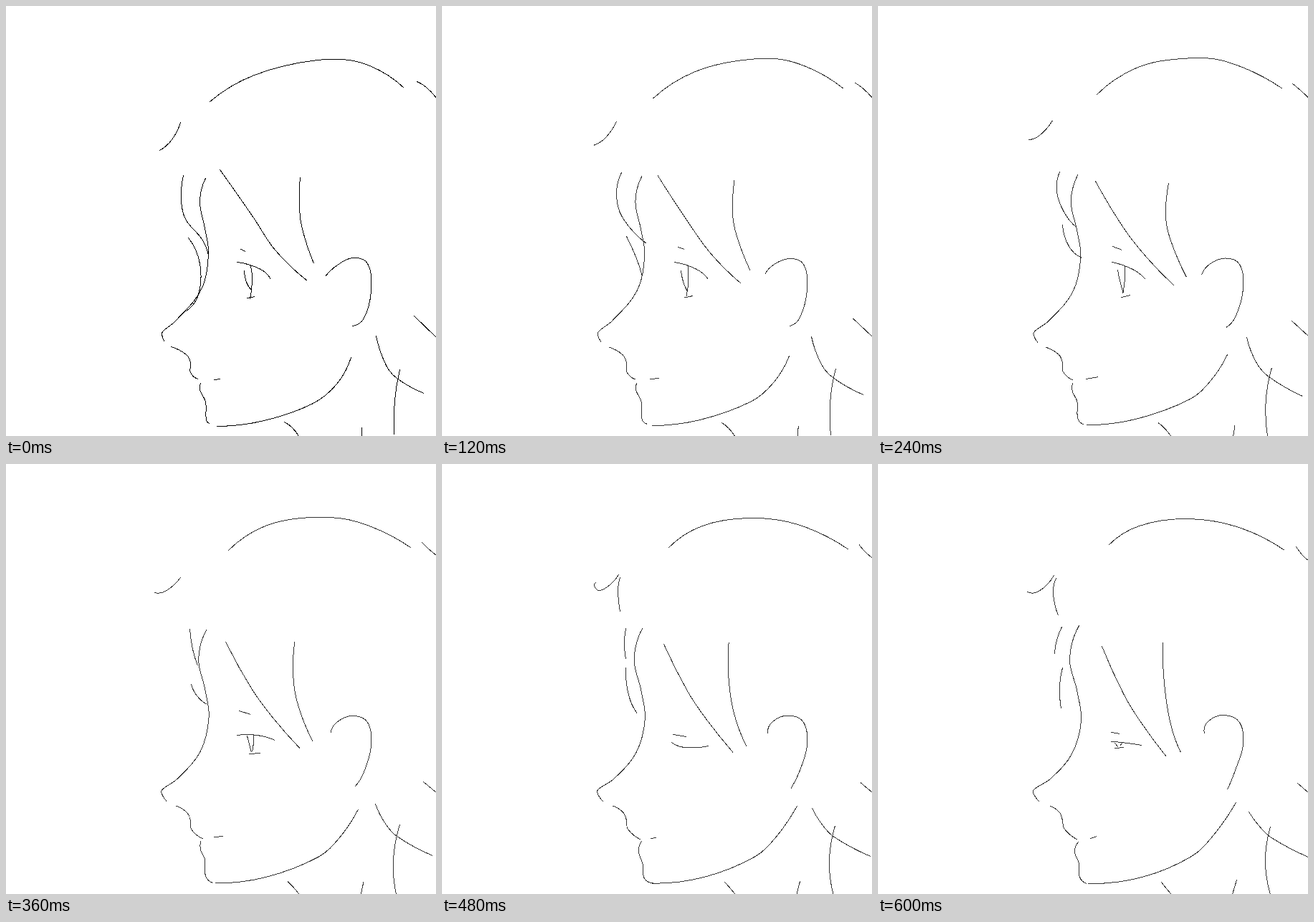
An HTML page that plays this animation: 600 by 600 pixels, repeating every 720 ms.

```html
<!DOCTYPE html>
<html lang="en">
<head>
<meta charset="utf-8">
<title>Blinking profile</title>
<style>
html, body { margin: 0; width: 100%; height: 100%; overflow: hidden; background: #fff; }
svg { display: block; width: 100%; height: 100%; }
path { fill: none; stroke: #333; stroke-width: 1; shape-rendering: crispEdges; }
g:first-child path { stroke: #000; }
g { visibility: hidden; animation: pose 720ms step-end infinite; }
@keyframes pose {
  0% { visibility: visible; }
  16.666%, 100% { visibility: hidden; }
}
</style>
</head>
<body>
<svg id="stage" viewBox="0 0 600 600"></svg>
<script>
const POSES = 6, HOLD = 120;

const make = (tag, attrs, parent) => {
  const el = document.createElementNS('http://www.w3.org/2000/svg', tag);
  for (const k in attrs) el.setAttribute(k, attrs[k]);
  return parent.appendChild(el);
};

const stage = document.getElementById('stage');
const poses = Array.from({ length: POSES }, (_, i) => make('g', {
  transform: 'translate(.5 .5)',
  style: `animation-delay:${(i ? i - POSES : 0) * HOLD}ms`
}, stage));

const sub = (a, b) => [a[0] - b[0], a[1] - b[1]];
const unit = ([x, y]) => {
  const len = Math.hypot(x, y) || 1;
  return [x / len, y / len];
};
// Mirror a tangent in its chord, so that the end of a line keeps bending.
const mirror = (dir, chord) => {
  const dot = 2 * (dir[0] * chord[0] + dir[1] * chord[1]);
  return [dot * chord[0] - dir[0], dot * chord[1] - dir[1]];
};

function curve(pts) {
  const last = pts.length - 1;
  if (last === 1) return `M${pts[0]}L${pts[1]}`;
  const dirs = pts.map((p, i) => unit(sub(pts[Math.min(i + 1, last)], pts[Math.max(i - 1, 0)])));
  dirs[0] = mirror(dirs[1], dirs[0]);
  dirs[last] = mirror(dirs[last - 1], dirs[last]);
  let d = 'M' + pts[0];
  for (let i = 1; i <= last; i++) {
    const a = pts[i - 1], b = pts[i], u = dirs[i - 1], v = dirs[i];
    const h = Math.hypot(...sub(b, a)) * .35;
    d += `C${a[0] + u[0] * h},${a[1] + u[1] * h} ${b[0] - v[0] * h},${b[1] - v[1] * h} ${b}`;
  }
  return d;
}

const parse = text => text.split(' ').map(p => p.split(',').map(Number));

// Draw one line in every pose, blending between the given key poses.
function trace(keys) {
  const times = Object.keys(keys).map(Number);
  poses.forEach((group, i) => {
    const from = times.filter(t => t <= i).pop();
    if (from === undefined || !keys[from]) return;
    const to = times.find(t => t >= i) ?? from;
    const k = to > from ? (i - from) / (to - from) : 0;
    const a = parse(keys[from]), b = parse(keys[to]);
    const pts = k ? a.map((p, n) => p.map((v, axis) => v + (b[n][axis] - v) * k)) : a;
    make('path', { d: curve(pts) }, group);
  });
}

// Crown and back of the head
trace({
  0: '284,133 346,96 434,75 496,79 555,114',
  2: '304,124 360,86 424,73 485,77 564,115',
  5: '321,113 364,86 430,76 500,87 567,120'
});
trace({ 0: '573,105 586,113 600,128', 3: '580,109 588,117 600,127', 5: '583,115 592,127 600,134' });

// Tuft
trace({
  0: '243,162 231,186 214,201',
  3: '243,158 222,177 207,179',
  4: '246,154 234,168 219,176 212,169 215,165',
  5: '245,155 224,177 208,178'
});
trace({ 4: '248,158 245,175 248,206', 5: '248,159 244,180 251,211' });

// Fringe
trace({
  0: '247,236 244,270 250,297 273,325 282,347',
  1: '250,232 243,262 251,294 285,331',
  2: '253,231 249,258 259,287 277,309',
  3: '256,230 260,258 267,281',
  4: '256,229 254,250 256,272',
  5: '256,227 249,245 246,265'
});
trace({
  0: '254,323 270,359 268,402 251,425',
  1: '257,321 271,352 279,377',
  2: '257,305 266,335 284,351',
  3: '258,307 266,323 280,335',
  4: '256,284 260,322 272,348',
  5: '257,284 253,310 255,341'
});

// Forehead and nose
trace({
  0: '278,240 270,272 277,310 282,345 272,395 236,439 219,453 217,458 221,468',
  5: '280,225 267,272 277,315 283,358 270,404 241,438 218,453 216,458 225,471'
});

// Lips, chin and jaw
trace({ 0: '230,475 251,486 257,497 257,511 268,520', 5: '240,477 253,486 257,497 259,508 278,524' });
trace({
  0: '271,526 270,535 278,552 279,577 284,582',
  3: '271,526 271,538 277,551 278,574 288,584',
  4: '278,526 274,540 280,559 282,578 295,584',
  5: '279,527 274,541 280,557 281,576 291,585'
});
trace({
  0: '294,586 360,578 428,554 461,527 481,490',
  2: '291,584 359,576 435,548 464,522 487,486',
  5: '293,585 368,576 437,547 468,517 499,472'
});
trace({ 0: '290,521 299,520', 2: '290,520 307,517', 3: '290,520 303,519', 4: '291,522 299,521', 5: '296,522 305,519' });

// Brow, lid and eye
trace({
  0: '327,339 334,342', 1: '329,336 338,339', 2: '327,335 340,340',
  3: '325,344 341,349', 4: '322,377 341,380', 5: '325,374 337,376'
});
trace({
  0: '322,357 355,367 369,381',
  2: '326,357 355,367 373,381',
  3: '322,378 350,378 375,385',
  4: '320,388 338,395 372,393',
  5: '325,387 340,388 368,392'
});
trace({ 0: '332,369 335,385 342,396', 2: '334,368 337,383 342,400', 3: '336,379 342,402', 4: '', 5: '330,389 335,395' });
trace({ 0: '341,362 343,382 340,409', 2: '344,363 344,380 341,401', 3: '345,378 345,388 343,401', 4: '', 5: '340,389 337,393' });
trace({ 0: '336,407 347,405', 2: '339,406 352,403', 3: '339,404 355,403', 4: '', 5: '330,396 343,395' });

// Side locks
trace({
  0: '298,228 345,295 375,340 420,383',
  2: '303,244 342,309 375,351 413,390',
  5: '312,254 342,320 365,358 402,408'
});
trace({
  0: '410,239 409,284 414,315 429,359',
  2: '405,247 401,292 407,324 430,378',
  5: '397,249 399,306 408,363 422,402'
});

// Ear
trace({
  0: '445,377 462,361 484,351 504,359 509,397 499,435 483,446',
  1: '450,374 463,360 485,352 504,360 509,395 499,434 485,446',
  5: '455,376 460,359 482,350 504,360 509,391 498,427 487,454'
});

// Nape and neck
trace({ 0: '569,432 600,462', 2: '577,439 600,460', 3: '582,443 600,458', 5: '585,445 600,458' });
trace({
  0: '516,460 530,501 545,519 583,540',
  2: '514,462 528,498 545,517 592,544',
  3: '515,474 528,500 545,519 595,546',
  5: '517,485 530,503 547,520 600,548'
});
trace({ 0: '549,507 542,550 541,598', 3: '549,503 540,552 544,600', 5: '547,506 540,553 547,600' });
trace({ 0: '388,580 399,588 408,600', 5: '395,583 402,592 409,600' });
trace({ 0: '496,587 496,600', 5: '500,580 494,600' });
</script>
</body>
</html>
```
